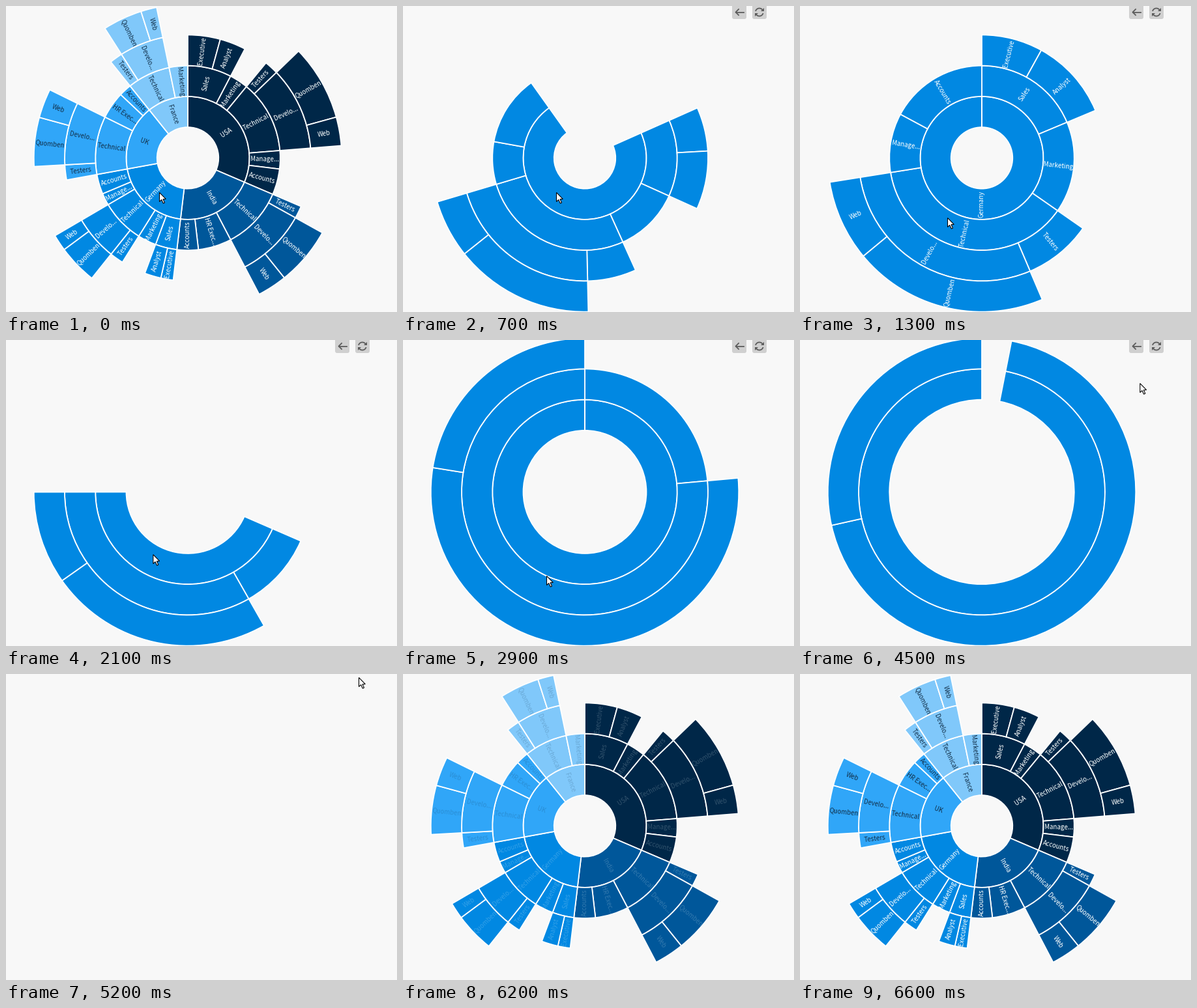
Animation, 600 px wide and 470 px high, one loop 6700 ms. Source, as a matplotlib script:

```python
import numpy as np
import matplotlib.pyplot as plt
from matplotlib.animation import FuncAnimation
from matplotlib.patches import Arc, FancyBboxPatch, Polygon, Wedge

W, H, DPI = 600, 470, 100
FRAMES, STEP = 67, 100
CX, CY, RING = 279, 233.4, 47.25
BG, BUTTON, ICON = "#f8f8f8", "#d0d0d0", "#5c5c5c"
PX = 72 / DPI

APP = "Quomben"


def developers(app, web):
    return ("Develo...", [(APP, app), ("Web", web)])


def technical(testers, app, web):
    return ("Technical", [("Testers", testers), developers(app, web)])


def sales(executive, analyst):
    return ("Sales", [("Executive", executive), ("Analyst", analyst)])


# Leaf sizes are in degrees of the full circle.
COUNTRIES = [
    ("USA", "#002748", "white",
     [sales(15.3, 12.3), ("Marketing", 11.8), technical(6.6, 28.6, 10.8),
      ("Manage...", 11.5), ("Accounts", 16.3)]),
    ("India", "#00579a", "white",
     [technical(5.9, 22.1, 11.2), ("HR Exec...", 21.0), ("Accounts", 13.4)]),
    ("Germany", "#0188e2", "white",
     [sales(5.85, 7.77), ("Marketing", 11.66), technical(6.49, 14.87, 6.19),
      ("Manage...", 7.56), ("Accounts", 12.5)]),
    ("UK", "#30a6f8", "#12304a",
     [technical(7.1, 18.5, 11.0), ("HR Exec...", 17.1), ("Accounts", 7.9)]),
    ("France", "#80c8fa", "#12304a",
     [technical(6.1, 14.9, 6.0), ("Marketing", 11.7)]),
]


def size(body):
    return sum(size(b) for _, b in body) if isinstance(body, list) else body


def walk(name, body, start, path, fill, ink):
    path = path + (name,)
    yield path, start, start + size(body), fill, ink
    if isinstance(body, list):
        for child, sub in body:
            yield from walk(child, sub, start, path, fill, ink)
            start += size(sub)


def build():
    segs, start = [], 0
    for name, fill, ink, body in COUNTRIES:
        segs += walk(name, body, start, (), fill, ink)
        start += size(body)
    k = 360 / start
    return [(p, a * k, b * k, fill, ink) for p, a, b, fill, ink in segs]


SEGS = build()
SPAN = {p: (a, b) for p, a, b, _, _ in SEGS}
SPAN[()] = (0, 360)

FOCUS = [(), ("Germany",), ("Germany", "Technical"),
         ("Germany", "Technical", "Develo...")]


def sweep(k):
    return 1 if k >= 9 else max(0, (k - 0.18) / 9)


def fade(t, start, steps):
    return float(np.clip((t - start + STEP) / (steps * STEP), 0, 1))


def state(t):
    """Zoom level, sweep progress and label opacity at time t."""
    if t < 200:
        return 0, 1, 1
    if t < 2100:
        return 1, sweep((t - 100) / STEP), fade(t, 1100, 3)
    if t < 3700:
        return 2, sweep((t - 2000) / STEP), fade(t, 3100, 3)
    if t < 5200:
        return 3, sweep((t - 3700) / STEP), 0
    return 0, min(1, (t - 5200) / 600), fade(t, 6200, 5)


def angle(a, level, p):
    def zoom(path):
        lo, hi = SPAN[path]
        return (a - lo) / (hi - lo) * 360
    if level == 0:
        return a * p
    return (1 - p) * zoom(FOCUS[level - 1]) + p * zoom(FOCUS[level])


POINTER = [(0, 235, 286), (900, 235, 286), (1300, 226, 325), (2000, 226, 325),
           (2900, 220, 362), (3000, 220, 362), (3300, 217, 385),
           (3900, 217, 385), (4600, 572, 13), (4700, 572, 13), (4800, 541, 5)]
ARROW = np.array([(0, 0), (0, 14), (3.2, 11), (5.8, 16.6), (8, 15.6),
                  (5.5, 10.2), (9.8, 10)])

fig = plt.figure(figsize=(W / DPI, H / DPI), dpi=DPI, facecolor=BG)
ax = fig.add_axes([0, 0, 1, 1])
ax.set_xlim(0, W)
ax.set_ylim(H, 0)
ax.axis("off")


def make_buttons():
    arts = []
    for x in (505, 536):
        box = FancyBboxPatch((x + 3, 0), 16, 17, fc=BUTTON, ec="none", zorder=5,
                             boxstyle="round,pad=3,rounding_size=3")
        arts.append(ax.add_patch(box))
    line = dict(color=ICON, lw=1.8 * PX, zorder=6)
    arts += ax.plot([510.5, 523], [9.5, 9.5], **line)
    arts += ax.plot([515, 510.5, 515], [5, 9.5, 14], **line)
    for a in (195, 15):
        arts.append(ax.add_patch(Arc((546.8, 9.5), 12, 12, theta1=a,
                                     theta2=a + 135, **line)))
    for tip in ([(553.8, 3), (553.8, 8.2), (548.6, 8.2)],
                [(539.8, 16), (539.8, 10.8), (545, 10.8)]):
        arts.append(ax.add_patch(Polygon(tip, fc=ICON, ec="none", zorder=6)))
    return arts


buttons = make_buttons()
pointer = ax.add_patch(Polygon(ARROW, fc="white", ec="black", lw=1.1 * PX, zorder=9))
drawn = []


def draw_segment(path, a, b, fill, ink, alpha):
    depth = len(path)
    wedge = Wedge((CX, CY), RING * (depth + 1), a - 90, min(b, a + 359.999) - 90,
                  width=RING, fc=fill, ec="white", lw=1.8 * PX)
    drawn.append(ax.add_patch(wedge))
    if alpha > 0:
        mid = (a + b) / 2
        r, th = RING * (depth + 0.5), np.radians(mid)
        turn = 90 - mid if mid < 179.99 else 270 - mid
        drawn.append(ax.text(CX + r * np.sin(th), CY - r * np.cos(th), path[-1],
                             rotation=turn, ha="center", va="center", color=ink,
                             alpha=alpha, fontsize=9.7 * PX, zorder=4,
                             family="Noto Sans CJK JP"))


def update(i):
    t = i * STEP
    while drawn:
        drawn.pop().remove()
    level, p, alpha = state(t)
    root = FOCUS[level]
    for path, a, b, fill, ink in SEGS:
        if path[:len(root)] == root and p + level > 0:
            draw_segment(path, angle(a, level, p), angle(b, level, p),
                         fill, ink, alpha)
    for art in buttons:
        art.set_visible(level > 0)
    times, xs, ys = zip(*POINTER)
    pointer.set_xy(ARROW + (np.interp(t, times, xs) + 0.5, np.interp(t, times, ys) + 0.5))
    pointer.set_visible(t < 5400)
    return drawn + buttons + [pointer]


anim = FuncAnimation(fig, update, frames=FRAMES, interval=STEP, repeat=True,
                     repeat_delay=0, init_func=lambda: update(0), blit=False)
plt.show()
```
